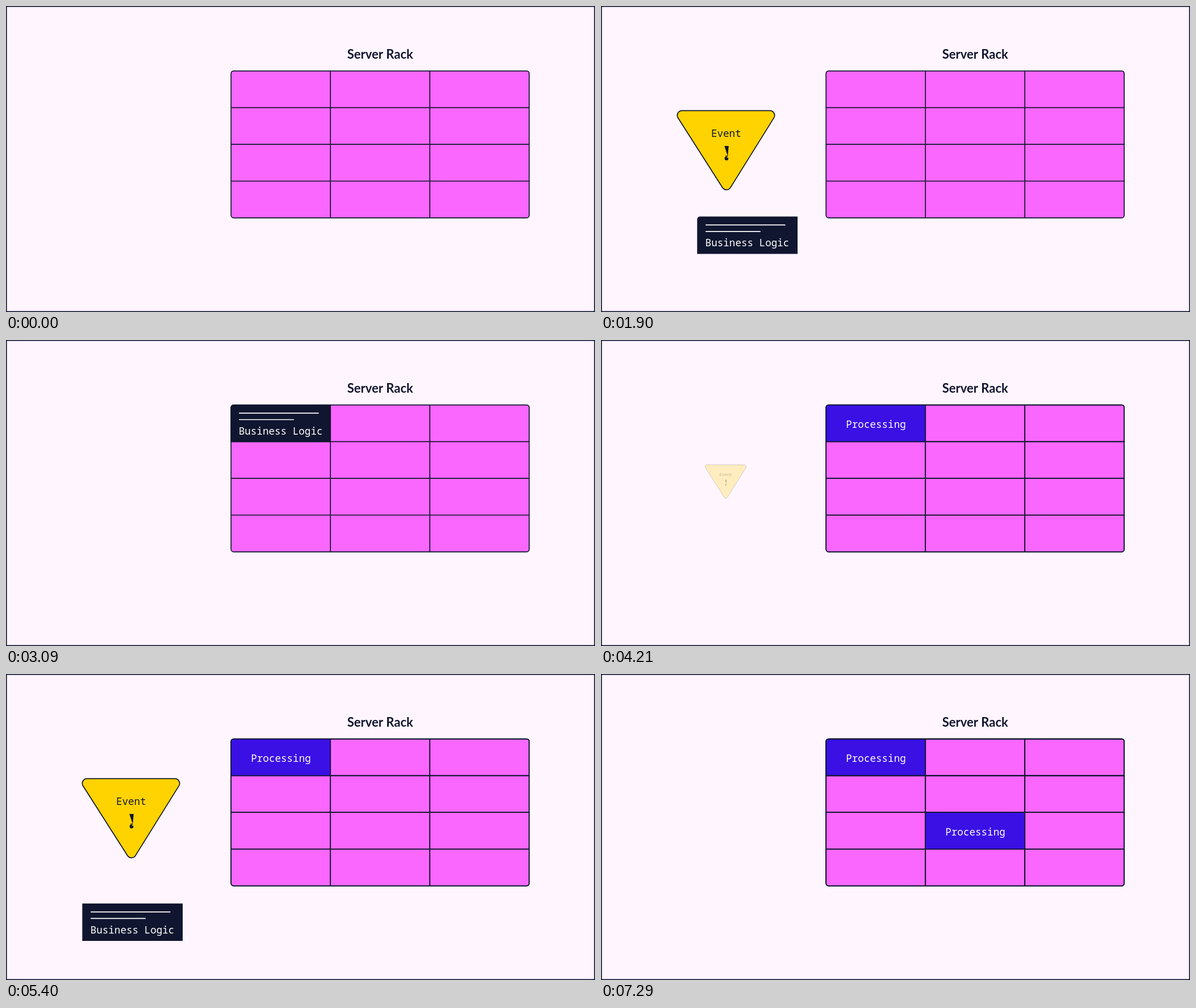
Recreate the animation shown at these times as an HTML page with a canvas. Size 1037 px wide and 540 px high, loop 7990 ms.

```html
<!DOCTYPE html>
<html lang="en">
<head>
<meta charset="utf-8">
<title>Server Rack</title>
<style>
  html, body { margin: 0; height: 100%; overflow: hidden; background: #fff5ff; }
  canvas { display: block; }
</style>
</head>
<body>
<canvas id="stage" width="1037" height="540"></canvas>
<script>
const ctx = document.getElementById('stage').getContext('2d');
const LOOP = 7990, TICK = 70;
const NAVY = '#10162f', PINK = '#f967ff', BLUE = '#3a10e5', YELLOW = '#ffd300';
const MONO = '17.6px "Noto Sans Mono", monospace';
const RACK = { x: 396.2, y: 114.6, cellW: 175, cellH: 64.8, cols: 3, rows: 4 };
const BLOCK = { w: 176.8, h: 66 };

const runs = [
  { event: 500, logic: 1200, move: 1900, settle: 3090, process: 3230,
    from: [137, 408.3], to: [395.4, 114.2], col: 0, row: 0, radius: 5 },
  { event: 4210, logic: 5050, move: 5750, settle: LOOP, process: 7080,
    from: [134.3, 405], to: [570.6, 244], col: 1, row: 2, radius: 0 },
];

// Whole ticks since start, including the one in progress
const ticks = (t, start, count) =>
  Math.max(0, Math.min(count, Math.floor((t - start) / TICK + 1e-4) + 1));
const progress = (t, start, count) => ticks(t, start, count) / count;
const mix = (a, b, p) => a + (b - a) * p;

function text(str, x, y, font, color, align = 'center') {
  ctx.font = font;
  ctx.fillStyle = color;
  ctx.textAlign = align;
  ctx.fillText(str, x, y);
}

function line(x1, y1, x2, y2, color) {
  ctx.strokeStyle = color;
  ctx.beginPath();
  ctx.moveTo(x1, y1);
  ctx.lineTo(x2, y2);
  ctx.stroke();
}

// Fade in while growing past full size, then settle
function popped(t, start, cx, cy, draw) {
  const n = ticks(t, start, 6);
  if (!n) return;
  const scale = n <= 4 ? 1.1 * Math.sin(n * Math.PI / 8) : 1.1 - 0.05 * (n - 4);
  ctx.save();
  ctx.globalAlpha *= Math.min(1, n / 4);
  ctx.translate(cx, cy);
  ctx.scale(scale, scale);
  ctx.translate(-cx, -cy);
  draw();
  ctx.restore();
}

function drawEvent() {
  ctx.beginPath();
  ctx.moveTo(220, 184.7);
  ctx.arcTo(312.3, 184.7, 221, 331.6, 8.3);
  ctx.arcTo(221, 331.6, 127.5, 184.7, 8.3);
  ctx.arcTo(127.5, 184.7, 220, 184.7, 8.3);
  ctx.closePath();
  ctx.fillStyle = YELLOW;
  ctx.fill();
  ctx.strokeStyle = NAVY;
  ctx.stroke();
  text('Event', 220.3, 231, MONO, NAVY);
  ctx.beginPath();
  ctx.moveTo(217.2, 247);
  ctx.lineTo(224.8, 247);
  ctx.lineTo(223.3, 264);
  ctx.lineTo(218.7, 264);
  ctx.arc(221, 269, 3.4, 0, 7);
  ctx.fill();
}

function drawLogic(x, y, w, radius) {
  ctx.fillStyle = NAVY;
  ctx.beginPath();
  ctx.roundRect(x, y, w, BLOCK.h, [radius, 0, 0, 0]);
  ctx.fill();
  line(x + 14.8, y + 14.9, x + 155.2, y + 14.9, '#fff');
  line(x + 14.8, y + 26.3, x + 111.5, y + 26.3, '#fff');
  text('Business Logic', x + 14.3, y + 52.5, MONO, '#fff', 'left');
}

function drawRackLines() {
  const { x, y, cellW, cellH, cols, rows } = RACK;
  const right = x + cols * cellW, bottom = y + rows * cellH;
  for (let c = 1; c < cols; c++) line(x + c * cellW, y, x + c * cellW, bottom, NAVY);
  for (let r = 1; r < rows; r++) line(x, y + r * cellH, right, y + r * cellH, NAVY);
  rackPath();
  ctx.stroke();
}

function rackPath() {
  ctx.beginPath();
  ctx.roundRect(RACK.x, RACK.y, RACK.cols * RACK.cellW, RACK.rows * RACK.cellH, 4.5);
}

function drawProcessing(run, alpha) {
  const x = RACK.x + run.col * RACK.cellW, y = RACK.y + run.row * RACK.cellH;
  ctx.save();
  rackPath();
  ctx.clip();
  ctx.globalAlpha = alpha;
  ctx.fillStyle = BLUE;
  ctx.fillRect(x, y, RACK.cellW, RACK.cellH);
  text('Processing', x + 87.8, y + 40.5, MONO, '#fff');
  ctx.restore();
}

function drawRun(t, run) {
  const fade = progress(t, run.move + TICK, 7);
  if (fade < 1) {
    ctx.save();
    ctx.globalAlpha = 1 - fade;
    popped(t, run.event, 219, 246, drawEvent);
    ctx.restore();
  }
  const done = progress(t, run.process, 4);
  if (done < 1) {
    const p = progress(t, run.move, 8);
    const x = mix(run.from[0], run.to[0], p), y = mix(run.from[1], run.to[1], p);
    const w = BLOCK.w - (t >= run.settle ? 0.8 : 0);
    popped(t, run.logic, x + w / 2, y + BLOCK.h / 2, () => drawLogic(x, y, w, run.radius));
  }
  if (done > 0) {
    drawProcessing(run, done);
    drawRackLines();
  }
}

function render(t) {
  ctx.fillStyle = '#fff5ff';
  ctx.fillRect(0, 0, 1037, 540);
  ctx.lineWidth = 1.7;
  ctx.strokeStyle = NAVY;
  ctx.strokeRect(0.75, 0.75, 1035.5, 538.5);
  text('Server Rack', 658.8, 93, 'bold 22px Lato, sans-serif', NAVY);
  rackPath();
  ctx.fillStyle = PINK;
  ctx.fill();
  drawRackLines();
  runs.forEach(run => drawRun(t, run));
}

const began = performance.now();
function frame() {
  render((performance.now() - began) % LOOP);
  requestAnimationFrame(frame);
}
frame();
</script>
</body>
</html>
```
